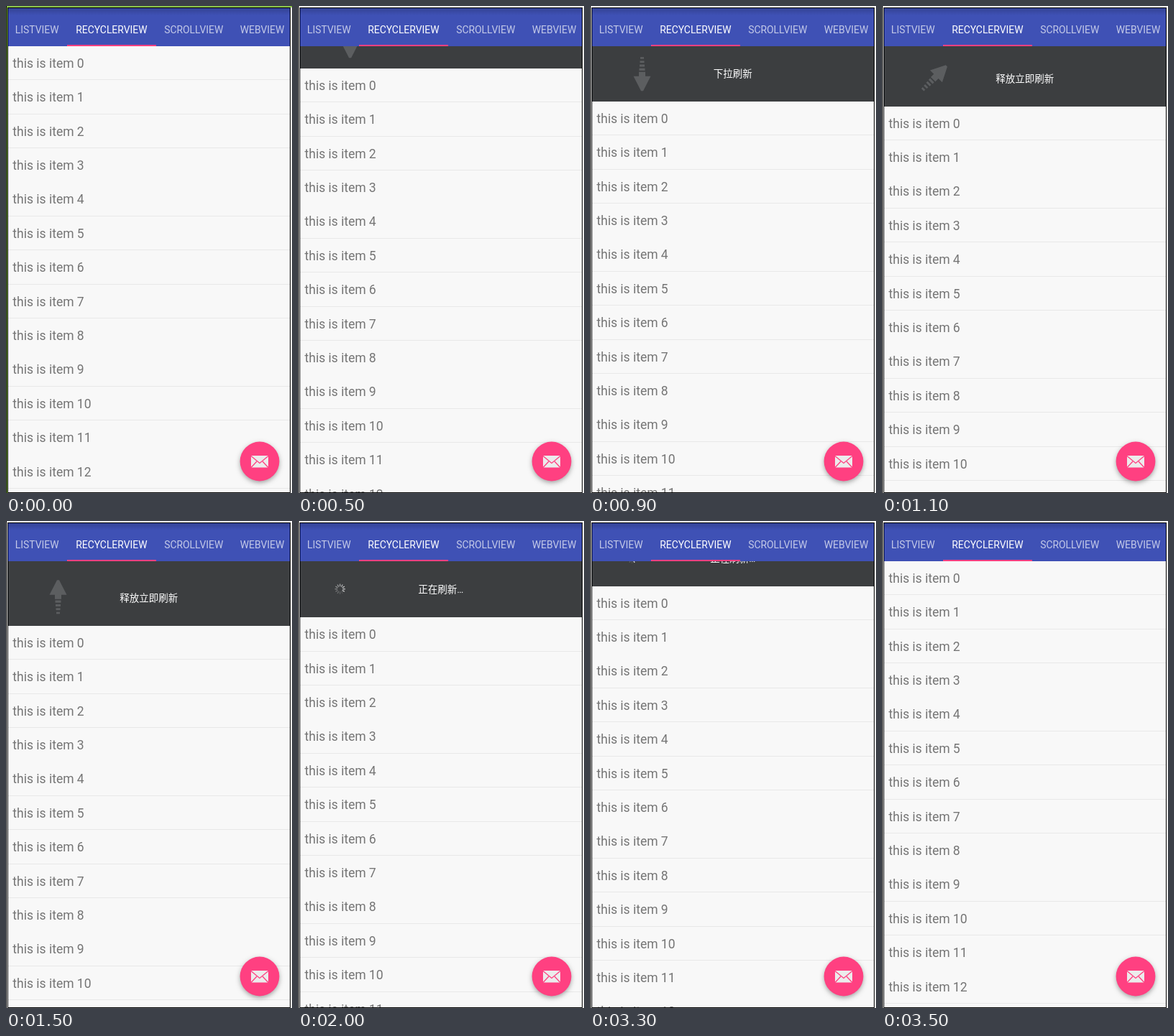
An HTML page with a canvas that plays this animation: 398 by 678 pixels, repeating every 3.8 s.

```html
<!DOCTYPE html>
<html lang="zh-CN">
<head>
<meta charset="utf-8">
<style>
  html, body { margin: 0; width: 398px; height: 678px; overflow: hidden; background: #fff; }
  canvas { display: block; }
</style>
</head>
<body>
<canvas id="stage" width="398" height="678"></canvas>
<script>
const ctx = document.getElementById('stage').getContext('2d');
const LOOP = 3800, STEP = 100, PITCH = 47.392;
const PULL = [3, 16, 31, 45, 58.31, 71, 77, 81, 83.82, 87, 89, 90, 90]; // per step from 300 ms
const FULL = 78.4, PINK = '#ff4081', ARROW = '#5c5e60';
const TABS = [['LISTVIEW', 12.8], ['RECYCLERVIEW', 97.2], ['SCROLLVIEW', 220.2], ['WEBVIEW', 325.7]];

const clamp = v => Math.min(1, Math.max(0, v));
const mix = (a, b, u) => a + (b - a) * u;
const easeOut = u => 1 - (1 - u) ** 2;
const easeBoth = u => (1 - Math.cos(Math.PI * u)) / 2;

function rect(color, x, y, w, h) {
  ctx.fillStyle = color;
  ctx.fillRect(x, y, w, h);
}

function label(str, x, y, size, color, align = 'left') {
  ctx.font = `${size}px Roboto, "Noto Sans CJK SC", "Noto Sans CJK", sans-serif`;
  ctx.textAlign = align;
  ctx.fillStyle = color;
  ctx.fillText(str, x, y);
}

function poly(points, close) {
  ctx.beginPath();
  points.forEach(([x, y]) => ctx.lineTo(x, y));
  if (close) ctx.closePath();
}

function headerHeight(t) {
  if (t < 300) return 0;
  if (t <= 1500) return PULL[(t - 300) / STEP];
  if (t <= 3200) return mix(90, FULL, easeOut(clamp((t - 1500) / 400)));
  return mix(FULL, 0, easeOut(clamp((t - 3200) / 300)));
}

function arrow(y, angle) {
  ctx.save();
  ctx.translate(72.5, y);
  ctx.rotate(angle);
  ctx.fillStyle = ARROW;
  poly([[-12, 4], [-4.5, 4], [-4.5, -2], [4.5, -2], [4.5, 4], [12, 4], [1.5, 24.5], [-1.5, 24.5]], true);
  ctx.fill();
  for (let i = 0; i < 4; i++) {
    const w = 8 - i;
    rect(ARROW, -w / 2, -7 - i * 5.2, w, 3.2 - i * 0.2);
  }
  ctx.restore();
}

function spinner(y, t) {
  const head = 11 + (t - 2700) / STEP;
  ctx.save();
  ctx.translate(58.5, y);
  ctx.lineWidth = 1.3;
  for (let i = 0; i < 12; i++) {
    const a = (head - i) * Math.PI / 6;
    const dx = Math.sin(a), dy = -Math.cos(a);
    ctx.strokeStyle = `rgba(235,235,235,${0.9 - i * 0.07})`;
    poly([[dx * 3.6, dy * 3.6], [dx * 7.2, dy * 7.2]]);
    ctx.stroke();
  }
  ctx.restore();
}

function header(t, bottom) {
  rect('#3c3e40', 3, 56, 392, bottom - 56);
  const mid = bottom - 39.3;
  const busy = t > 1500;
  if (busy) spinner(mid, t);
  else arrow(mid, -Math.PI * easeBoth(clamp((t - 980) / 180)));
  const text = busy ? '正在刷新…' : t < 1000 ? '下拉刷新' : '释放立即刷新';
  label(text, 198.8, Math.round(mid + 5.2), 13.5, '#fff', 'center');
}

function list(h, bottom) {
  rect('#f8f8f8', 3, bottom, 392, 677 - bottom);
  for (let k = 0; k < 14; k++) {
    label('this is item ' + k, 9.3, Math.round(85.8 + k * PITCH + h), 17.5, '#757575');
    // hairlines thinner than a pixel: some fall between rows
    const top = 54.57 + (k + 1) * PITCH + h, row = Math.ceil(top);
    if (row < top + 0.72) rect('#e8e8e8', 3, row, 392, 1);
  }
}

function tabBar() {
  rect('#3f51b5', 3, 3, 392, 53);
  const shade = ctx.createLinearGradient(0, 3, 0, 13);
  shade.addColorStop(0, 'rgba(0,0,0,.18)');
  shade.addColorStop(1, 'rgba(0,0,0,0)');
  rect(shade, 3, 3, 392, 10);
  TABS.forEach(([name, x], i) => label(name, x, 38, 13.9, i === 1 ? '#fff' : '#c3c9e8'));
  rect(PINK, 85, 54, 124, 2);
}

function mailButton() {
  ctx.save();
  ctx.shadowColor = 'rgba(0,0,0,.34)';
  ctx.shadowBlur = 6;
  ctx.shadowOffsetY = 2.5;
  ctx.fillStyle = PINK;
  ctx.beginPath();
  ctx.arc(353, 634, 27.4, 0, Math.PI * 2);
  ctx.fill();
  ctx.restore();
  rect('#ececec', 341, 626, 24, 16.5);
  ctx.strokeStyle = PINK;
  ctx.lineWidth = 1.3;
  [
    [[341, 626.5], [353, 636.5], [365, 626.5]],
    [[341, 642.5], [349, 634]],
    [[365, 642.5], [357, 634]]
  ].forEach(line => { poly(line); ctx.stroke(); });
}

function border(t) {
  const edge = t < 300 ? '#8bc34a' : '#fff';
  rect('#000', 0, 0, 1, 678);
  rect(edge, 1, 0, 397, 2);
  rect(edge, 1, 0, 1, 678);
  rect('#fff', 396, 2, 2, 676);
  ctx.strokeStyle = '#000';
  ctx.lineWidth = 1;
  ctx.strokeRect(2.5, 2.5, 393, 675);
}

function draw() {
  const t = Math.floor(performance.now() % LOOP / STEP) * STEP;
  const h = headerHeight(t), bottom = Math.round(55.85 + h);
  header(t, bottom);
  list(h, bottom);
  tabBar();
  mailButton();
  border(t);
  requestAnimationFrame(draw);
}
draw();
</script>
</body>
</html>
```
